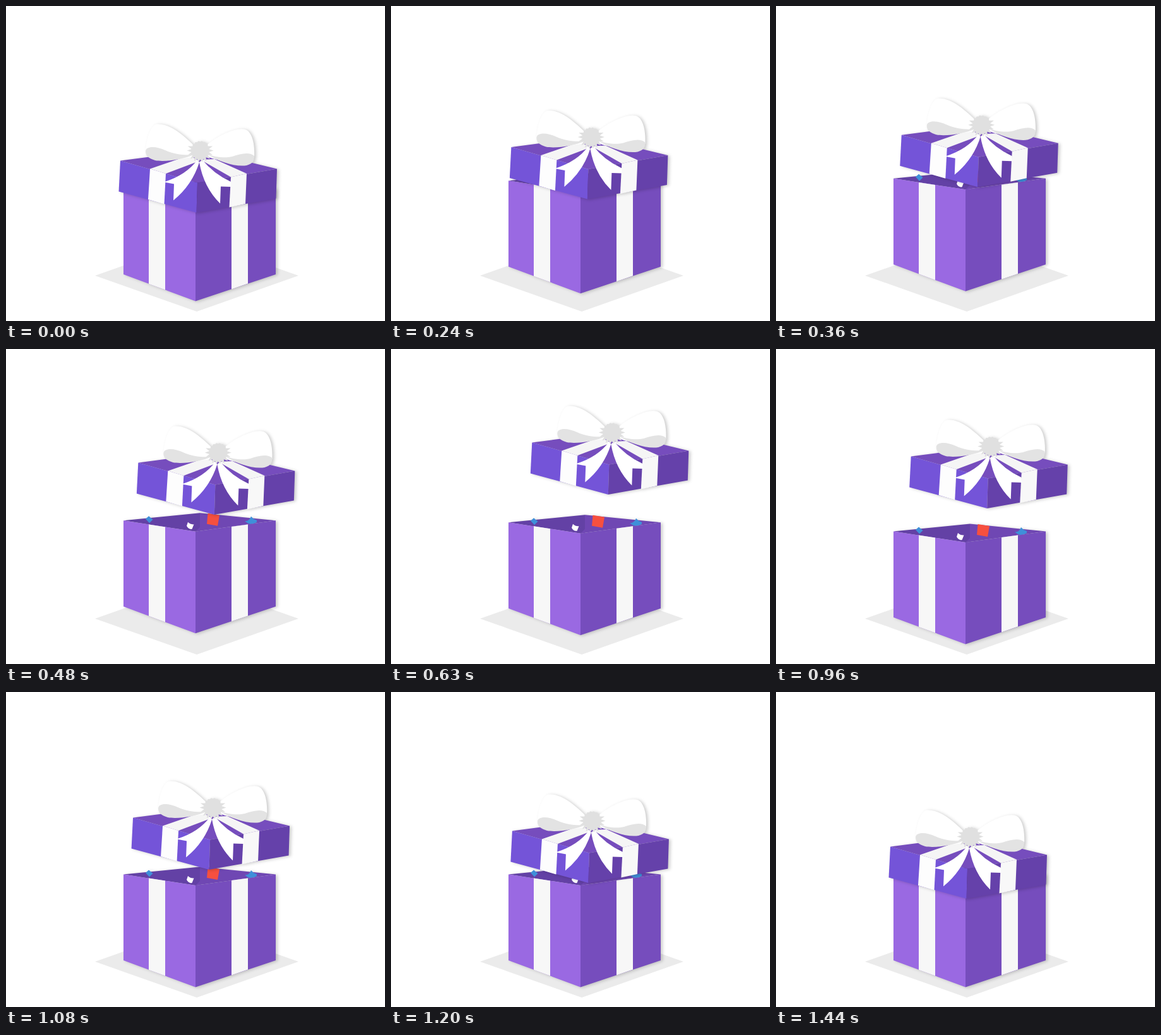
Animation of 600x500 px, one loop 1.8 s. Source, as an HTML page:

```html
<!DOCTYPE html>
<html lang="en">
<head>
<meta charset="utf-8">
<title>Gift box</title>
<style>
  html, body { margin: 0; width: 100%; height: 100%; overflow: hidden; background: #fff; }
  svg { display: block; width: 600px; height: 500px; }
</style>
</head>
<body>
<svg viewBox="0 0 600 500">
  <defs>
    <filter id="soft" x="-10%" y="-10%" width="120%" height="120%" color-interpolation-filters="sRGB">
      <feDropShadow dx="3" dy="1" stdDeviation="2.6" flood-color="#000" flood-opacity=".2"/>
    </filter>
  </defs>

  <path fill="#ebebeb" d="M141 428L302 371L463 428L302 485Z"/>

  <g id="box" filter="url(#soft)">
    <path fill="#6341a5" d="M186 289.5L307 277.5V306L300 307Z"/>
    <path fill="#6f47b3" d="M307 277.5L427 289.5L300 307L307 300Z"/>
    <path fill="#3f8fd9" d="M221 287L226 282.5L232.5 288L227 293.5Z"/>
    <path fill="#fff" d="M288 292Q292 296 297.5 295.5L294.5 303Q289 304 286 298Z"/>
    <path fill="#f6503f" d="M319.5 278L338 281L335 298L318 295Z"/>
    <path fill="#3f8fd9" d="M378 290.5Q385 291 388 283L392 287L397 289V292Q390 297 383 294Z"/>
    <path fill="#9a69e2" d="M186 289.5L300 307V468.5L186 426Z"/>
    <path fill="#764dbd" d="M300 307L427 289.5V426L300 468.5Z"/>
    <path fill="#f7f7f7" d="M226 295.6L252 299.6V450.6L226 441Z"/>
    <path fill="#f7f7f7" d="M357 299.1L383 295.6V440.6L357 449.4Z"/>
  </g>

  <g id="lid" filter="url(#soft)">
    <path fill="#764dbd" d="M181 245.5L307 229L429 258.5L303 280.5Z"/>
    <path fill="#7454d8" d="M181 245.5L303 280.5L301.5 328L178.5 294.5Z"/>
    <path fill="#6541aa" d="M303 280.5L429 258.5L427.5 305.5L301.5 328Z"/>
    <path fill="#f5f5f5" d="M228 258.5L253 266L306 246L290 237Z"/>
    <path fill="#f5f5f5" d="M356 271.5L381 266L330 243L308 244Z"/>
    <path fill="#fdfdfd" d="M228 258.5L253 266L250.5 314.5L225 307Z"/>
    <path fill="#f8f8f8" d="M356 271.5L381 266L379 314L353.5 319.5Z"/>

    <path fill="#fff" d="M303 244Q286 268 250 279.5L266 282.5L265 308.5Q295 284 306 248Z"/>
    <path fill="#fff" d="M306 248Q313 288 339 313.5L340 286.5L356 287V279Q328 266 311 244Z"/>
    <path fill="#fff" d="M300 224C282 206 260 186 239 187.5C228 189 222 214 221 230C228 242 270 246 298 239Z"/>
    <path fill="#fff" d="M314 224C334 206 364 192 379 196C390 200 394 220 393 240C382 251 340 249 316 238Z"/>
    <path fill="#e3e3e3" d="M221 231C221 221 240 223 252 229C268 236 282 237 297 236C282 243 252 248 236 245C226 242 221 238 221 231Z"/>
    <path fill="#e3e3e3" d="M393 238C386 231 372 234 358 239C345 242 330 239 320 236C336 247 364 256 381 253C391 250 393 246 393 238Z"/>
    <polygon id="knot" fill="#e0e0e0"/>
  </g>
</svg>
<script>
const LOOP = 1800, STEP = 30;
const box = document.getElementById('box');
const lid = document.getElementById('lid');

// [time, height] pairs for the lid's flight
const flight = [
  [0, 0], [60, 2.4], [120, 7.3], [180, 13.7], [240, 21.5], [360, 40.7],
  [480, 65], [540, 77], [720, 117], [750, 121], [780, 116.5], [870, 96],
  [960, 75], [1020, 60], [1080, 46], [1140, 35], [1200, 25], [1290, 13],
  [1380, 4], [1440, 0], [LOOP, 0]
];

function lidHeight(t) {
  const i = flight.findIndex(p => p[0] > t);
  const [t0, h0] = flight[i - 1], [t1, h1] = flight[i];
  return h0 + (h1 - h0) * (t - t0) / (t1 - t0);
}

function boxHeight(t) {
  if (t < 500) return 17.2 * (1 - (1 - t / 500) ** 1.9);
  if (t >= 960) return 0;
  const k = (t - 500) / 480;
  return 17.2 * (1 + Math.cos(Math.PI * k)) / 2;
}

// Frayed knot: spikes shrink towards the top
const spikes = 18, knot = [];
for (let i = 0; i < spikes * 2; i++) {
  const a = i * Math.PI / spikes;
  const reach = Math.sin(a) < -0.6 ? 1.5 : 4 + 3 * Math.abs(Math.cos(a));
  const r = 14 + (i % 2 ? 0 : reach);
  knot.push((307.5 + r * Math.cos(a)).toFixed(1) + ',' + (229.5 + r * Math.sin(a)).toFixed(1));
}
document.getElementById('knot').setAttribute('points', knot.join(' '));

function draw(now) {
  const t = Math.floor((now % LOOP) / STEP) * STEP;
  const h = lidHeight(t);
  lid.setAttribute('transform', `translate(${0.436 * h} ${-h})`);
  box.setAttribute('transform', `translate(0 ${-boxHeight(t)})`);
}

let start;
function tick(now) {
  start ??= now;
  draw(now - start);
  requestAnimationFrame(tick);
}
draw(0);
requestAnimationFrame(tick);
</script>
</body>
</html>
```
